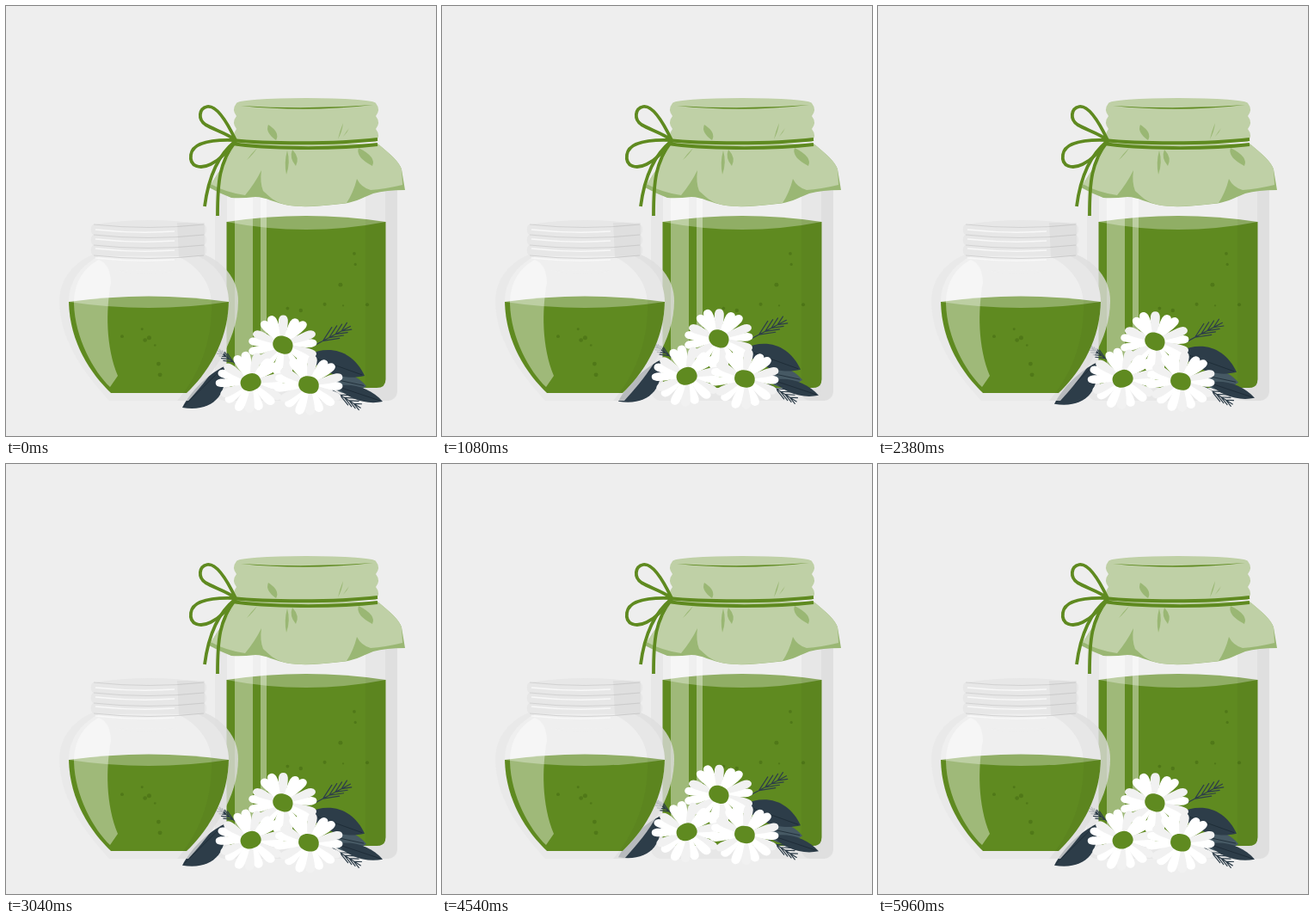
Write an HTML page that moves like this. It is 500 px wide and 500 px high and loops after 6000 ms.

```html
<!DOCTYPE html>
<html lang="en">
<head>
<meta charset="utf-8">
<title>Jam jars</title>
<style>
html, body { margin: 0; width: 100%; height: 100%; overflow: hidden; background: #eee; }
svg { display: block; width: 100%; height: 100%; }
.green { fill: #5f8a20; }
.surface { fill: #90ae65; }
.seed { fill: #507818; }
.cloth { fill: #bfd0a6; }
.fold { fill: #9ab774; }
.cord { fill: none; stroke: #5f8a20; stroke-width: 3.8; }
.leaf { fill: #2d3d49; }
.blade { fill: #465964; }
.twig { fill: none; stroke: #2d3d49; stroke-width: 1.2; stroke-linecap: round; }
.vein { fill: none; stroke: #1d2b36; stroke-width: .8; }
.glass { fill: #e7e7e7; }
.wall { fill: #e8e8e8; opacity: .78; }
.inside { fill: #efefef; }
.shine { fill: #fff; opacity: .4; }
.shade { fill: #000; opacity: .035; }
.thread { fill: none; stroke: #d2d2d2; }
.glint { fill: none; stroke: #f8f8f8; stroke-width: 1.5; }
.petal { fill: #fff; }
.under { fill: #f1f1f1; }
</style>
</head>
<body>
<svg id="stage" viewBox="0 0 500 500"></svg>
<script>
const path = (cls, d, transform = '') => `<path class="${cls}" d="${d}" transform="${transform}"/>`;
const rect = (cls, x, y, w, h, r = 0) =>
  `<rect class="${cls}" x="${x}" y="${y}" width="${w}" height="${h}" rx="${r}"/>`;
const repeat = (n, make) => Array.from({ length: n }, (_, i) => make(i)).join('');

let seed = 7;
const random = () => (seed = seed * 16807 % 2147483647) / 2147483647;
const scatter = (n, x, y, w, h) => repeat(n, () =>
  `<circle class="seed" cx="${x + w * random()}" cy="${y + h * random()}" r="${1 + 1.6 * random()}"/>`);

// Flat oval made of two arcs between the same ends.
const lens = (cls, x1, x2, y, up, down) => {
  const mid = (x1 + x2) / 2;
  return path(cls, `M${x1} ${y}Q${mid} ${y - 2 * up} ${x2} ${y}Q${mid} ${y + 2 * down} ${x1} ${y}Z`);
};

// Cylinder with bulging rows down both sides.
const collar = (cls, x1, x2, y, rows, step, bulge) => path(cls,
  `M${x1} ${y}H${x2}${`q${bulge} ${step / 2} 0 ${step}`.repeat(rows)}` +
  `H${x1}${`q${-bulge} ${-step / 2} 0 ${-step}`.repeat(rows)}Z`);

// Bezier points of a left side, mirrored to the right about cx.
function mirrored(cls, points, cx) {
  const [start, ...rest] = points;
  const [end, ...back] = points.map(([x, y]) => [2 * cx - x, y]).reverse();
  return path(cls, `M${start}C${rest.join(' ')}L${end}C${back.join(' ')}Z`);
}

function leaf(cls, x1, y1, x2, y2, up, down) {
  const length = Math.hypot(x2 - x1, y2 - y1);
  const angle = Math.atan2(y2 - y1, x2 - x1) * 180 / Math.PI;
  const place = `translate(${x1} ${y1}) rotate(${angle})`;
  const a = length * .3, b = length * .7;
  return path(cls, `M0 0C${a} ${-up} ${b} ${-up} ${length} 0C${b} ${down} ${a} ${down} 0 0Z`, place) +
    path('vein', `M3 0H${length - 3}`, place);
}

function twig(x, y, angle, length) {
  const branches = repeat(4, i => {
    const at = length * (.25 + .17 * i), size = length * (.38 - .05 * i);
    return `M${at} 0l${size * .9} ${-size * .5}M${at} 0l${size} ${size * .35}`;
  });
  return path('twig', `M0 0H${length}${branches}`, `translate(${x} ${y}) rotate(${angle})`);
}

function flower(x, y, turn, tilt) {
  const count = 17;
  const petals = repeat(count, i => {
    const length = 39.5 + 1.5 * Math.sin(i * 1.7);
    return path(i % 3 == 1 ? 'under' : 'petal',
      `M0 -2C14 -3 24 -6 ${length - 6} -5.4Q${length} -4.5 ${length} 0Q${length} 4.5 ${length - 6} 5.4C24 6 14 3 0 2Z`,
      `rotate(${turn + i * 360 / count + 3 * Math.sin(i * 2.4)})`);
  });
  return `<g transform="translate(${x} ${y})"><g transform="scale(1 .88)">${petals}</g>` +
    path('green', 'M-12 0C-12 -7 -6 -10 1 -10C8 -10 12 -5 12 1C12 7 7 10 0 10C-7 10 -12 6 -12 0Z',
      `rotate(${tilt})`) + '</g>';
}

const tallJar =
  rect('glass', 243, 190, 212, 269, 12) +
  rect('inside', 257, 205, 184, 239, 10) +
  path('green', 'M256.5 251H441.5V434Q441.5 444 431 444H267Q256.5 444 256.5 434Z') +
  lens('surface', 256.5, 441.5, 251, 7, 9) +
  scatter(9, 300, 275, 130, 105) +
  rect('shine', 266, 205, 21, 239) + rect('shine', 296, 205, 7, 239) +
  rect('shade', 418, 205, 37, 254, 10);

// Thin creases: x, y, slant, length.
const crease = (x, y, slant, length) => path('fold',
  `M${x} ${y}q${slant + 5} ${length / 2} ${slant} ${length}q${-slant - 4} ${-length / 2} ${-slant} ${-length}Z`);

const cloth =
  path('fold', 'M266 160H432C447 172 458 182 460 190L464 214Q442 214 427 218C412 224 404 229 390 230Q350 235 330 232C312 229 302 222 290 222Q273 224 262 223Q249 218 236 211C247 193 259 178 266 160Z') +
  path('cloth', 'M266 160H432C447 172 458 182 460 190L461 208Q440 213 424 214Q413 211 408 201Q404 217 396 229Q350 235 330 232C312 229 306 221 299 215Q295 205 297 191Q289 207 278 220Q256 217 238 207C248 192 259 178 266 160Z') +
  collar('cloth', 268, 430, 113, 3, 15, 6) +
  '<ellipse class="cloth" cx="349" cy="113" rx="81" ry="6"/>' +
  path('green', 'M273 116Q349 121 427 115Q349 124 273 116Z') +
  crease(305, 138, 9, 18) + crease(392, 136, -6, 19) + crease(399, 142, -7, 10) +
  crease(292, 165, -12, 14) + crease(327, 168, -1, 28) + crease(333, 167, 4, 19) + crease(410, 165, 16, 21) +
  path('cord', 'M263 156C300 160 382 161 432 155M263 160C300 166 382 167 432 161') +
  path('cord', 'M267 156C258 137 245 115 234 117C224 119 223 132 232 138C242 144 257 148 267 156C242 155 217 158 215 173C213 187 226 190 238 184C251 178 258 167 267 156') +
  path('cord', 'M267 157C245 174 235 202 231 233M267 157C248 182 246 204 246 244');

const posy =
  twig(358, 395, -28, 48) + twig(380, 447, 32, 38) + twig(270, 418, -144, 29) +
  leaf('blade', 372, 432, 419, 442, 12, 18) +
  leaf('leaf', 350, 406, 417, 430, 22, 14) +
  leaf('leaf', 384, 442, 438, 460, 10, 10) +
  leaf('leaf', 205, 467, 254, 419, 7, 28) +
  flower(322, 394, -4, 25) + flower(284.5, 437.5, 8, -20) + flower(352, 440.5, 3, 15);

const center = 166;
const outer = [[101, 289], [81, 297], [62, 316], [62, 343], [62, 394], [100, 437], [120, 459]];
const inner = [[108, 291], [88, 301], [73, 319], [73, 344], [74, 392], [99, 428], [122, 450]];

const roundJar =
  mirrored('wall', outer, center) +
  mirrored('inside', inner, center) +
  mirrored('green', inner.slice(3), center) +
  lens('surface', 73, 259, 344, 6.5, 7) +
  scatter(7, 130, 365, 85, 70) +
  collar('glass', 101, 231, 254, 3, 12, 5) +
  lens('glass', 102, 232, 254, 5, 3) +
  repeat(4, i => path('thread', `M102 ${254 + 12 * i}q64 7 128 0`) +
    path('glint', `M104 ${260 + 11 * i}q46 5 92 2`)) +
  path('shine', 'M108 295C89 305 79 323 79 346C80 386 102 425 121 443L130 430C116 396 116 354 122 322Q122 301 108 295Z') +
  lens('inside', 127, 199, 307, -1, 5) +
  path('shade', 'M199 252H231V289C251 297 270 316 270 343C270 394 232 437 212 459H199C224 430 240 391 239 345C238 320 221 301 201 292Z');

document.getElementById('stage').innerHTML = `${tallJar}${cloth}<g id="posy">${posy}</g>${roundJar}`;
const bouquet = document.getElementById('posy');

const rise = 10, period = 3000;
function draw(now) {
  const phase = now % period / period;
  const lift = rise * (1 - Math.abs(1 - 2 * phase));
  bouquet.setAttribute('transform', `translate(0 ${-lift})`);
  requestAnimationFrame(draw);
}
draw(performance.now());
</script>
</body>
</html>
```
